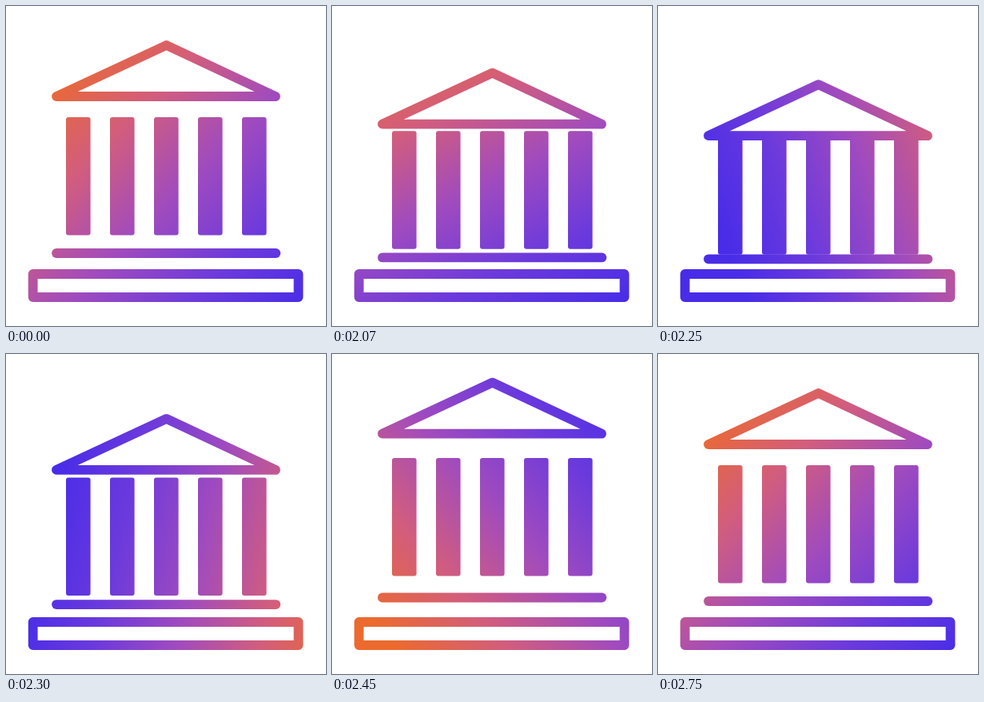
An HTML page with a canvas that plays this animation: 400x400 px, repeating every 2.77 s.

```html
<!DOCTYPE html>
<html lang="en">
<head>
<meta charset="utf-8">
<title>Bank icon</title>
<style>
  html, body { margin: 0; width: 100%; height: 100%; overflow: hidden; background: #fff; }
  canvas { display: block; width: 400px; height: 400px; }
</style>
</head>
<body>
<canvas id="stage" width="400" height="400"></canvas>
<script>
const LOOP = 2770, STEP = 25;
const BEGIN = 2000, LOW = 2160, SPIN_END = 2540, REST = 2750;
const COLORS = ['#ec6a2e', '#d25d7d', '#a04bbe', '#6c3adc', '#482ce8'];
const ctx = document.getElementById('stage').getContext('2d');

const progress = (t, from, to) => Math.min(1, Math.max(0, (t - from) / (to - from)));
const mix = (a, b, u) => a + (b - a) * u;
const easeOut = u => 1 - (1 - u) ** 1.25;
const easeInOut = u => (1 - Math.cos(Math.PI * u)) / 2;

// Drop to the low point, spring up past the rest position, settle back.
function bounce(t, drop, overshoot, crest) {
  if (t < LOW) return drop * easeOut(progress(t, BEGIN, LOW));
  if (t < crest) return mix(drop, overshoot, easeInOut(progress(t, LOW, crest)));
  return overshoot * (1 - easeInOut(progress(t, crest, REST)));
}

// One full turn of the gradient; it shifts and tightens halfway.
function spinGradient(t) {
  const u = progress(t, BEGIN, SPIN_END);
  const bump = Math.sin(Math.PI * u) ** 2;
  const angle = Math.PI * (2 * u ** 1.5 - 0.75);
  const length = 430 - 30 * bump;
  const mid = 0.42 + 0.22 * bump;
  const dx = Math.cos(angle) * length, dy = Math.sin(angle) * length;
  const g = ctx.createLinearGradient(
    200 + dx * mid, 200 + dy * mid,
    200 - dx * (1 - mid), 200 - dy * (1 - mid));
  COLORS.forEach((color, i) => g.addColorStop(i / (COLORS.length - 1), color));
  return g;
}

function line(points, closed) {
  ctx.beginPath();
  points.forEach(([x, y]) => ctx.lineTo(x, y));
  if (closed) ctx.closePath();
  ctx.stroke();
}

function draw(t) {
  const roof = 113 + bounce(t, 63.5, -15, 2480);
  const pillar = 139 + bounce(t, 31.5, -10.5, 2490);
  const step = 309 + bounce(t, 10, -4.8, 2480);

  ctx.fillStyle = '#fff';
  ctx.fillRect(0, 0, 400, 400);
  ctx.fillStyle = ctx.strokeStyle = spinGradient(t);
  ctx.lineWidth = 11.8;
  ctx.lineCap = ctx.lineJoin = 'round';

  line([[63, roof], [200.5, roof - 64], [337, roof]], true);
  for (let i = 0; i < 5; i++) {
    ctx.beginPath();
    ctx.roundRect(75 + i * 55, pillar, 30.6, 147.6, 3);
    ctx.fill();
  }
  line([[63, step], [337.3, step]]);
  line([[33.7, 335], [365.5, 335], [365.5, 364], [33.7, 364]], true);
}

const start = performance.now();
function tick() {
  const t = (performance.now() - start) % LOOP;
  // The picture advances in fixed steps.
  draw(Math.floor((t + 6) / STEP) * STEP);
  requestAnimationFrame(tick);
}
tick();
</script>
</body>
</html>
```
